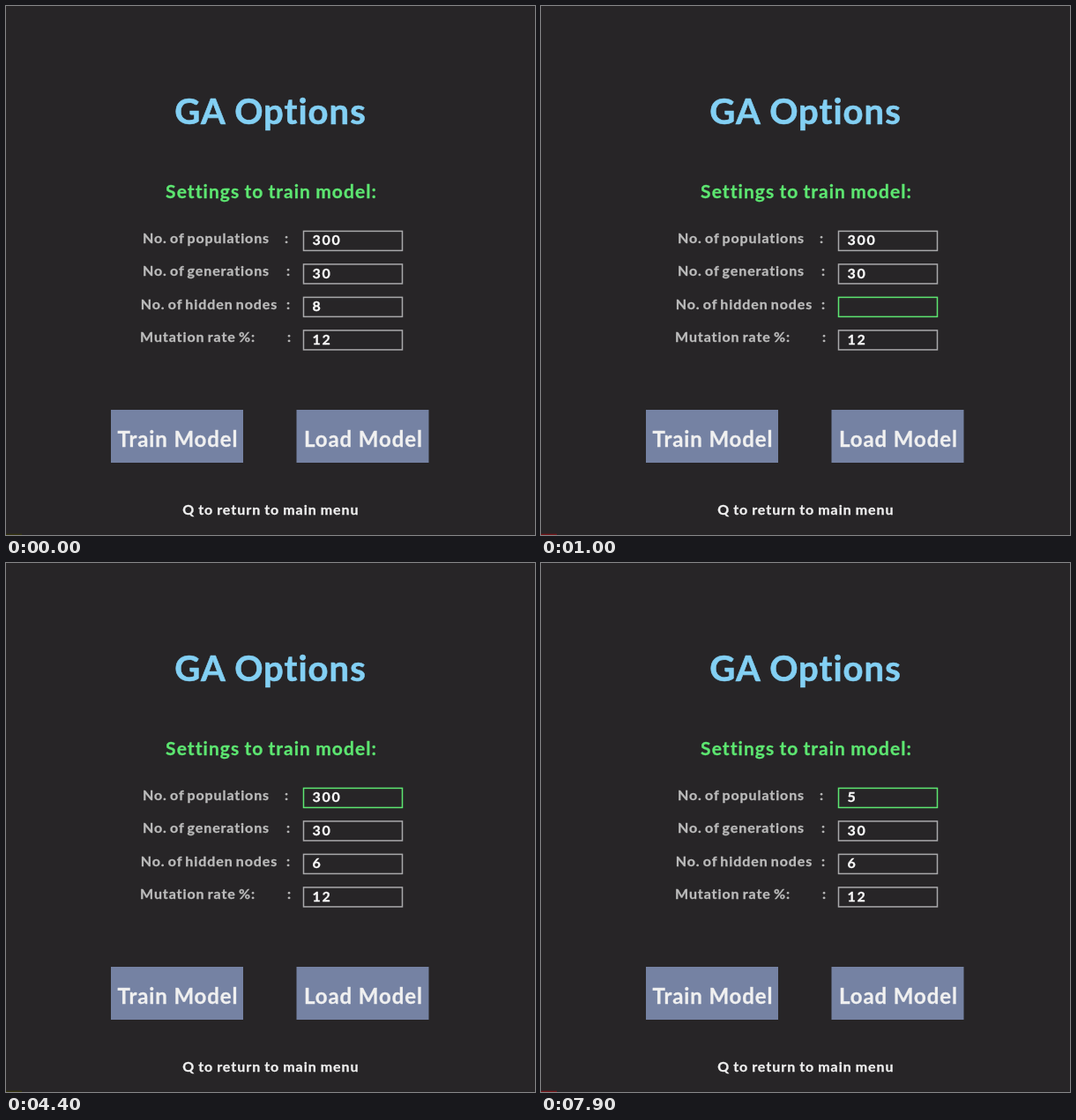
An HTML page that plays this animation: 600x600 px, repeating every 8 s.

```html
<!DOCTYPE html>
<html lang="en">
<head>
<meta charset="utf-8">
<title>GA Options</title>
<style>
  html, body { margin: 0; width: 100%; height: 100%; overflow: hidden; background: #272527; }
  svg { display: block; width: 100%; height: 100%; }
  text { font-family: Lato, "Open Sans", sans-serif; font-weight: 700; white-space: pre;
    fill: currentColor; stroke: currentColor; stroke-width: .3; }
  .mid { text-anchor: middle; }
  .title { font-size: 40px; letter-spacing: 1px; color: #83d0f4; stroke-width: .6; }
  .sub { font-size: 21px; letter-spacing: 1.05px; word-spacing: -1px; color: #5de671; }
  .label { font-size: 16px; letter-spacing: .9px; word-spacing: -1.5px; color: #bcbcbc; }
  .value { font-size: 16px; letter-spacing: 1.7px; color: #fafafa; }
  .button { font-size: 24px; letter-spacing: .9px; color: #f0f0f0; }
  .hint { font-size: 16px; letter-spacing: 1px; word-spacing: -1px; color: #f0f0f0; }
  .box { fill: none; stroke-width: 1.5; }
</style>
</head>
<body>
<svg id="stage" viewBox="0 0 600 600"></svg>
<script>
const LOOP = 8000;
const GREY = '#a9a9ab', GREEN = '#5de671';
const stage = document.getElementById('stage');

function add(tag, attrs, content = '') {
  const el = document.createElementNS('http://www.w3.org/2000/svg', tag);
  for (const key in attrs) el.setAttribute(key, attrs[key]);
  el.textContent = content;
  return stage.appendChild(el);
}
const text = (cls, x, y, content) => add('text', { class: cls, x, y }, content);

// Latest value of a [time, value] step list
function stepAt(steps, t) {
  let value = steps[0][1];
  for (const [start, v] of steps) if (t >= start) value = v;
  return value;
}

add('rect', { width: 600, height: 600, fill: '#272527' });
text('title mid', 300, 134, 'GA Options');
text('sub mid', 301, 217.5, 'Settings to train model:');

const rows = [
  { label: 'No. of populations', mid: 227, colon: 318,
    steps: [[0, '300'], [4600, '30'], [4900, '3'], [5200, ''], [7800, '5']] },
  { label: 'No. of generations', mid: 227, colon: 320, steps: [[0, '30']] },
  { label: 'No. of hidden nodes', mid: 230.5, colon: 320,
    steps: [[0, '8'], [800, ''], [1300, '6']] },
  { label: 'Mutation rate %:', mid: 217.5, colon: 321, steps: [[0, '12']] }
];
const focus = [[0, -1], [100, 2], [3500, 0]];

rows.forEach((row, i) => {
  const y = 255.4 + i * 37.5;
  text('label mid', row.mid, y + 13.4, row.label);
  text('label mid', row.colon + 0.4, y + 13.4, ':');
  row.box = add('rect', { class: 'box', x: 337.5, y, width: 112, height: 22 });
  row.value = text('value', 347.5, y + 15.6, '');
});

[[119, 'Train Model'], [329.5, 'Load Model']].forEach(([x, name]) => {
  add('rect', { x, y: 458, width: 150, height: 60, fill: '#7582a3' });
  text('button mid', x + 76, 499.5, name);
});
text('hint mid', 300.5, 577, 'Q to return to main menu');

const blink = add('rect', { x: 0, y: 598.7, width: 18, height: 1.3 });
const toggles = [100, 500, 1000, 1400, 1900, 2400, 2900, 3400, 3900,
  4400, 4900, 5500, 5900, 6400, 7000, 7400, 7900];

function draw(t) {
  const active = stepAt(focus, t);
  rows.forEach((row, i) => {
    row.box.setAttribute('stroke', i === active ? GREEN : GREY);
    row.value.textContent = stepAt(row.steps, t);
  });
  const red = toggles.filter(s => t >= s).length % 2;
  blink.setAttribute('fill', red ? '#741519' : '#35340f');
}

let begin;
function tick(now) {
  begin ??= now;
  draw((now - begin) % LOOP);
  requestAnimationFrame(tick);
}
draw(0);
requestAnimationFrame(tick);
</script>
</body>
</html>
```
